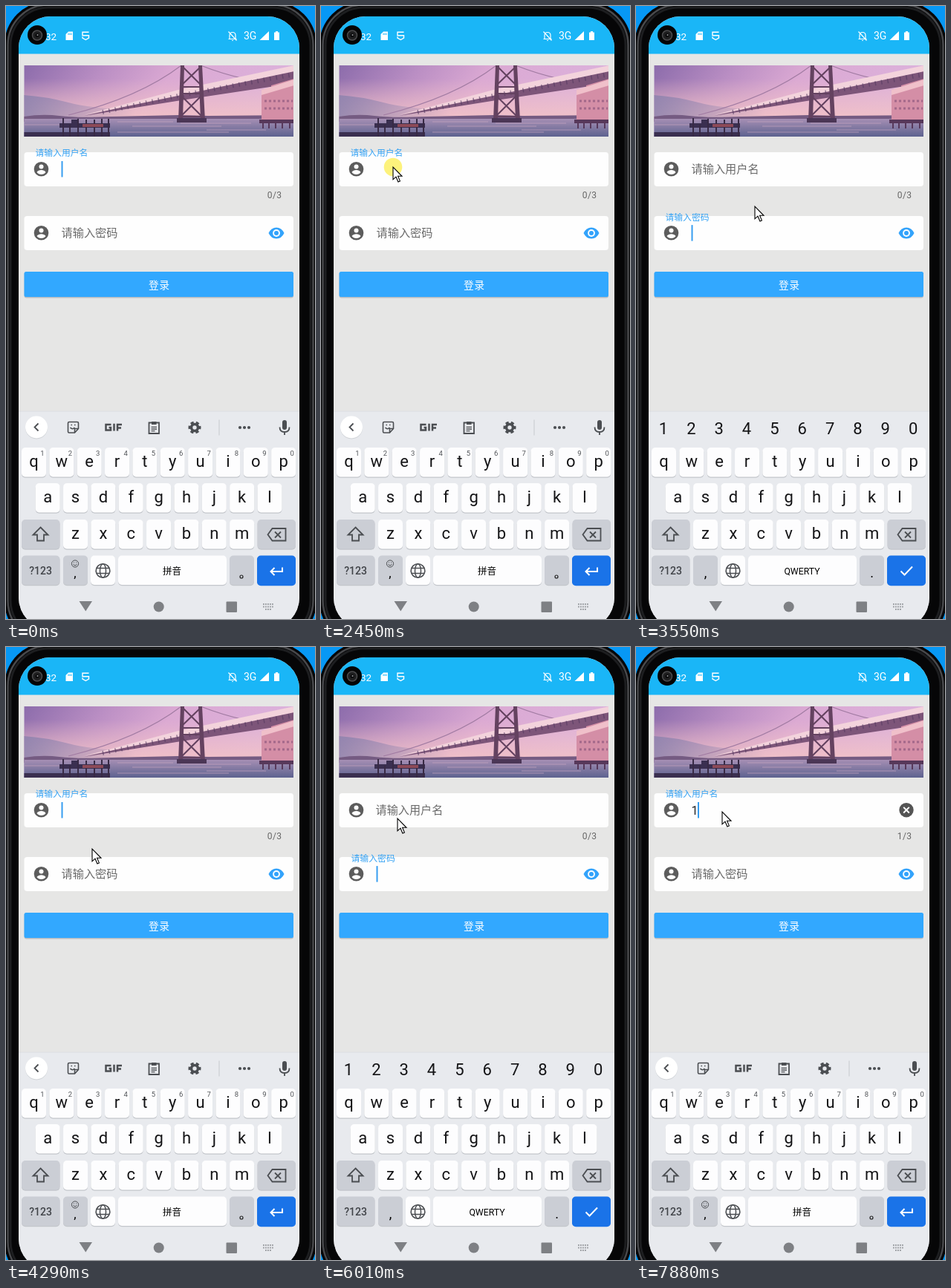
Write an HTML page that moves like this. It is 416 by 826 pixels and loops after 8000 ms.

```html
<!DOCTYPE html>
<html lang="zh-CN">
<head>
<meta charset="utf-8">
<title>Login form</title>
<style>
html, body { margin: 0; width: 100%; height: 100%; overflow: hidden; background: #0798f5; }
svg { display: block; width: 416px; height: 826px; font-family: Roboto, 'Noto Sans CJK SC', 'Noto Sans CJK', sans-serif; }
.cjk { font-family: 'Noto Sans CJK SC', 'Noto Sans CJK', sans-serif; }
.mid { text-anchor: middle; }
.key { font-size: 22px; fill: #141416; }
.line { fill: none; stroke: #4b4e52; stroke-width: 1.8; }
</style>
</head>
<body>
<svg viewBox="0 0 416 826" xmlns="http://www.w3.org/2000/svg">
  <defs>
    <clipPath id="screen"><rect x="17" y="14" width="378" height="826" rx="43"/></clipPath>
    <clipPath id="photo"><rect x="24.5" y="80" width="362.5" height="96"/></clipPath>
    <linearGradient id="sky" x2="1" y2=".2">
      <stop stop-color="#8c6cab"/><stop offset=".3" stop-color="#bb8fc4"/>
      <stop offset=".55" stop-color="#dba9d3"/><stop offset="1" stop-color="#dcb2dc"/>
    </linearGradient>
    <linearGradient id="glow" x2="0" y2="1">
      <stop offset=".2" stop-color="#f3c3c6" stop-opacity="0"/><stop offset="1" stop-color="#f3c3c6" stop-opacity=".9"/>
    </linearGradient>
    <linearGradient id="haze">
      <stop stop-color="#8c82ad" stop-opacity=".85"/><stop offset="1" stop-color="#8c82ad" stop-opacity="0"/>
    </linearGradient>
    <linearGradient id="sea" x2="0" y2="1">
      <stop stop-color="#a68fb4"/><stop offset="1" stop-color="#5d628f"/>
    </linearGradient>
  </defs>

  <!-- phone body -->
  <rect x="-2" y="-6" width="420" height="866" rx="58" fill="#060607"/>
  <rect x="2.5" y="-1.5" width="411" height="857" rx="54" fill="none" stroke="#48494c" stroke-width="2.5"/>
  <rect x="6" y="2" width="404" height="850" rx="51" fill="none" stroke="#1d1e20" stroke-width="3"/>

  <g clip-path="url(#screen)">
    <rect x="17" y="14" width="378" height="812" fill="#e6e6e5"/>
    <rect x="17" y="14" width="378" height="50.5" fill="#1ab6f7"/>

    <!-- status bar -->
    <g fill="#fff" font-size="13.5">
      <text x="53" y="45.5">32</text>
      <path d="M84 34.5h6v11.5h-9.500v-8z"/>
      <path d="M84 36.500v2.500M86 36.500v2.500M88 36.500v2.500" stroke="#1ab6f7"/>
      <path d="M111.500 35.200h-8.500v4.500h8.500v3.300l-4.200 2.500-4.300-2.500v-1.500" fill="none" stroke="#fff" stroke-width="1.400"/>
      <path d="M301 44.500v-5q0-4 4-4t4 4v5zM299.500 44.500h11M304 46.500h2M299.500 34.500l11 12" fill="none" stroke="#fff" stroke-width="1.2"/>
      <text x="320" y="45.3" font-size="14">3G</text>
      <path d="M354 34v12h-12.500zM362 35.500h1v-1.500h3v1.500h2v10.500h-7v-10.500z"/>
    </g>
    <circle cx="42" cy="39" r="13" fill="#050505"/>
    <circle cx="42" cy="39.500" r="6.500" fill="#1f1f20" stroke="#4a4a4c" stroke-width="1.500"/>
    <circle cx="42" cy="39.500" r="2.500" fill="#070708"/>
    <circle cx="42.500" cy="39" r="1" fill="#9b9b9d"/>

    <!-- header picture -->
    <g clip-path="url(#photo)">
      <rect x="24" y="80" width="364" height="96" fill="url(#sky)"/>
      <rect x="24" y="84" width="364" height="68" fill="url(#glow)"/>
      <path d="M24 120q30 2 60 10t90 10v14H24z" fill="url(#haze)"/>
      <path d="M24 149q25-4 48-1t70 1l90-2 40 1 116-1v9H24z" fill="#755b82"/>
      <rect x="24" y="152" width="364" height="24" fill="url(#sea)"/>
      <path d="M150 156h75M170 162h120M235 158h95M150 170h150M270 167h80M25 160h50" stroke="#d0abc4" opacity=".6"/>
      <path d="M84 147Q180 123 236 80M262 80Q320 103 388 108" fill="none" stroke="#a27ca3" stroke-width="1.200"/>
      <path d="M105 148L232 119 388 87v17L236 127z" fill="#7d5579"/>
      <path d="M105 147L232 113 388 80v8L236 120z" fill="#f3d3dc"/>
      <path d="M130 143l102-22 156-29" fill="none" stroke="#543a60" stroke-width="6" stroke-dasharray="1.500 7" opacity=".6"/>
      <path d="M235 80h5l-2 74h-6zM259 80h5l4 74h-6z" fill="#644260"/>
      <path d="M238 82l24 24M262 82l-25 24M237 122l26 26M262 122l-26 26M236 109h28M236 118h28M234 149h32" stroke="#644260" stroke-width="2" fill="none"/>
      <path d="M230 151h40v6h-40z" fill="#4b3656"/>
      <path d="M344 113l13-3v-3l31-9v58h-44z" fill="#d48ea6"/>
      <path d="M344 113l44-14v8l-44 13z" fill="#f0c0ca"/>
      <path d="M348 128h38M348 138h38" stroke="#a3688a" stroke-width="3" stroke-dasharray="3 3"/>
      <path d="M341 153h47v5h-47z" fill="#57385a"/>
      <path d="M346 158v7M354 158v7M363 158v7M372 158v7M382 158v7" stroke="#57385a" stroke-width="2"/>
      <path d="M72 158h16v-5h9v5h43v6H72zM24 170h116v6H24z" fill="#3a2f50"/>
      <path d="M77 151v25M86 160v16M97 152v24M108 153v23M119 153v23M129 152v24M138 152v24" stroke="#382a45" stroke-width="2"/>
      <path d="M103 159h28v4h-28z" fill="#8d4a58"/>
    </g>

    <!-- form -->
    <g id="form"></g>
    <g fill="#33a3fb" transform="translate(364 306)">
      <path d="M-10.500 0Q-7-7.500 0-7.500T10.500 0Q7 7.500 0 7.500T-10.500 0z"/>
      <circle r="4.900" fill="#fff"/><circle r="3"/>
    </g>
    <g id="clear" transform="translate(364 219.700)">
      <circle r="9.700" fill="#545454"/>
      <path d="M-3.800-3.800l7.600 7.600M3.800-3.800l-7.600 7.600" stroke="#fff" stroke-width="2"/>
    </g>
    <text id="value" x="74.500" y="225.500" font-size="16" fill="#252525">1</text>
    <text id="count" x="371.500" y="259" font-size="12" letter-spacing=".4" text-anchor="end" fill="#666"></text>
    <rect x="24.500" y="358.500" width="362.500" height="35" rx="3" fill="#b9bec3"/>
    <rect x="24.500" y="358" width="362.500" height="34" rx="2.500" fill="#32a8ff"/>
    <text class="cjk mid" x="206.300" y="380.700" font-size="13.800" letter-spacing=".6" fill="#fff">登录</text>

    <!-- keyboard -->
    <rect x="17" y="546" width="378" height="280" fill="#e8eaee"/>
    <path d="M17 546h378" stroke="#dcdee1"/>
    <g id="keys"></g>
    <g id="pinyin">
      <circle cx="41" cy="568.500" r="15" fill="#cfd2d6"/><circle cx="41" cy="567.500" r="15" fill="#fff"/>
      <g class="line">
        <path d="M43.500 562.500l-5 5 5 5"/>
        <path d="M85 560.500h11q1.500 0 1.500 1.500v7.500l-5 5.500h-7.500q-1.500 0-1.500-1.500v-11.500q0-1.500 1.500-1.500zM97 569.500h-4.500v5" stroke-width="1.600"/>
        <path d="M86.500 568q3 3.500 6 0M87.500 564.500h1.500M92 564.500h1.500" stroke-width="1.500"/>
        <path d="M192.500 561.500h13.500v14.500h-13.500z"/>
        <path d="M196 562h6.500" stroke-width="4"/>
        <path d="M195.500 567.300h7.500M195.500 570h7.500M195.500 572.700h5" stroke-width="1.300"/>
        <circle cx="254" cy="568" r="4.500" stroke-width="3.600"/>
        <circle cx="254" cy="568" r="7" stroke-width="3" stroke-dasharray="4.200 3.130" stroke-dashoffset="2.100"/>
        <path d="M287 557.500v21" stroke="#c6c9cd" stroke-width="1"/>
        <path d="M368.500 567.500q0 6.500 6.500 6.500t6.500-6.500M375 574v4"/>
      </g>
      <g fill="#4b4e52">
        <circle cx="315" cy="568" r="2.100"/><circle cx="321" cy="568" r="2.100"/><circle cx="327" cy="568" r="2.100"/>
        <rect x="372" y="558" width="6" height="13" rx="3"/>
        <path d="M141.500 564h-7v7.500h6.500v-3.500h-2.500M145.500 562.700v9.800M150 572.500v-8.500h6M150 568.500h5" fill="none" stroke="#4b4e52" stroke-width="2.500"/>
      </g>
      <g id="supers" font-size="9.500" fill="#505357"></g>
      <circle cx="93" cy="751.500" r="4.600" fill="none" stroke="#4b4e52"/>
      <path d="M90.500 752.500q2.500 3 5 0M91.500 749.500v1M94.500 749.500v1" fill="none" stroke="#4b4e52"/>
      <text class="mid" x="93" y="770" font-size="17">,</text>
      <circle cx="317" cy="769" r="2" fill="none" stroke="#222" stroke-width="1.200"/>
      <text class="cjk mid" x="223.500" y="765.500" font-size="12.500">拼音</text>
      <path d="M372 756.500v5.500h-15M361.500 757l-5 5 5 5" fill="none" stroke="#fff" stroke-width="2"/>
    </g>
    <g id="qwerty">
      <g id="digits"></g>
      <text class="mid" x="93.500" y="770" font-size="18">,</text>
      <text class="mid" x="317.500" y="770" font-size="18">.</text>
      <text class="mid" x="223.500" y="765.500" font-size="12.300">QWERTY</text>
      <path d="M356.500 761.500l5 5 10.500-11" fill="none" stroke="#fff" stroke-width="2"/>
    </g>

    <!-- special keys and navigation -->
    <g class="line">
      <path d="M46.500 702.500l10 10h-5.500v8h-9v-8h-5.500z"/>
      <path d="M358.500 704h18v16.500h-18l-6-8.250zM362 708.500l8 8M370 708.500l-8 8"/>
      <circle cx="130.500" cy="761" r="9.300" stroke-width="1.600"/>
      <ellipse cx="130.500" cy="761" rx="4" ry="9.300" stroke-width="1.500"/>
      <path d="M122 757.500h17M122 764.500h17" stroke-width="1.500"/>
    </g>
    <text class="mid" x="46.500" y="766" font-size="14" fill="#414449" font-weight="500">?123</text>
    <g fill="#7e8084">
      <path d="M98.500 802h17.500l-8.750 13.500z"/><circle cx="205.700" cy="809.500" r="7"/><rect x="296.500" y="802.500" width="14.500" height="14.500" rx="1"/>
    </g>
    <path d="M346 806h15M346 809.500h15M349 813h9" fill="none" stroke="#9b9ea2" stroke-width="1.800" stroke-dasharray="1.800 1.200"/>
  </g>

  <circle id="press" r="12.300" fill="#fdf27c"/>
  <path id="mouse" d="M0 0V16.800L4 13.200 6.900 20 9.400 18.900 6.600 12.300H12z" fill="#fff" stroke="#000" stroke-width="1.100"/>
</svg>
<script>
const LOOP = 8000, TYPED = 7670, SLIDE = 167, SWAP = 120;
const $ = id => document.getElementById(id);
const text = (x, y, s, cls = 'mid key') => `<text class="${cls}" x="${x}" y="${y}">${s}</text>`;
const key = (x, y, w = 33, fill = '#fdfdfe', shade = '#c3c6cb') =>
  `<rect x="${x}" y="${y + 1.2}" width="${w}" height="39.5" rx="5" fill="${shade}"/>` +
  `<rect x="${x}" y="${y}" width="${w}" height="39.5" rx="5" fill="${fill}"/>`;

const PITCH = 37.35, GREY = '#cbced5', BLUE = '#1a73e8';
const row = (letters, x, y) => [...letters].map((c, i) =>
  key(x + i * PITCH, y) + text(x + 16.5 + i * PITCH, y + 26, c)).join('');
const digits = (x, y, cls) => [...'1234567890'].map((c, i) => text(x + i * PITCH, y, c, cls)).join('');

$('keys').innerHTML = row('qwertyuiop', 21, 595) + row('asdfghjkl', 39.7, 643) + row('zxcvbnm', 77, 692) +
  key(21, 692, 51.5, GREY) + key(338.5, 692, 51.5, GREY) +
  key(21, 740.5, 51.5, GREY) + key(77, 740.5, 33, GREY) + key(114, 740.5) + key(151, 740.5, 146) +
  key(301, 740.5, 33, GREY) + key(338, 740.5, 52, BLUE, BLUE);
$('supers').innerHTML = digits(49, 605.5, 'mid');
$('digits').innerHTML = digits(37, 577, 'mid key');

const fields = [{ hint: '请输入用户名', y: 219.7 }, { hint: '请输入密码', y: 305.8 }];
$('form').innerHTML = fields.map(({ hint, y }, i) => `
  <rect x="24.500" y="${y - 22.7}" width="362.500" height="46" rx="4" fill="#fefefe"/>
  <g transform="translate(47.500 ${y})"><circle r="9.800" fill="#5c5c5c"/><circle cy="-3.200" r="3" fill="#fff"/>
  <path d="M-6 4.200Q-4 1.400 0 1.400T6 4.200Q4 7.200 0 7.200T-6 4.200z" fill="#fff"/></g>
  <rect id="caret${i}" x="74.500" y="${y - 10.7}" width="2" height="21.500" fill="#369df0"/>
  <text id="hint${i}" class="cjk" font-size="15.200">${hint}</text>`).join('');

// [time, field]: every tap that gives a field the focus
const taps = [[-250, 0], [2575, 0], [3090, 1], [4010, 0], [4720, 1], [5205, 0], [5860, 1], [6365, 0]];

// [time, x, y] of the pointer tip
const path = [
  [70, 390, 779], [450, 300, 438], [650, 300, 438], [1450, 203, 260], [1990, 138, 226], [2250, 138, 226],
  [2420, 97, 217], [2600, 97, 217], [2960, 144, 302], [3150, 144, 302], [3550, 160, 270], [3860, 125, 222],
  [4050, 125, 222], [4290, 116, 272], [4500, 118, 302], [4760, 118, 302], [5060, 107, 220], [5260, 107, 220],
  [5660, 100, 302], [5860, 100, 302], [6010, 103, 231], [6180, 104, 217], [6870, 104, 217], [7140, 116, 222]
];

const mix = (a, b, k) => a + (b - a) * k;
const clamp = k => Math.max(0, Math.min(1, k));
const smooth = k => k * k * (3 - 2 * k);

function pointer(t) {
  const i = path.findIndex(p => p[0] > t);
  if (i < 0) return path[path.length - 1].slice(1);
  if (!i) return path[0].slice(1);
  const [a, b] = [path[i - 1], path[i]], k = smooth((t - a[0]) / (b[0] - a[0]));
  return [mix(a[1], b[1], k), mix(a[2], b[2], k)];
}

const show = (id, on) => $(id).setAttribute('opacity', +on);

function draw(t) {
  const n = taps.filter(p => p[0] <= t).length - 1;
  const [start, active] = taps[n], last = n ? taps[n - 1][1] : active;
  const since = t - start, moved = active !== last, typed = t >= TYPED;
  const blink = Math.floor((typed ? t - TYPED : since) / 500) % 2 === 0;
  const tinted = moved && since < 20 ? last : active;

  fields.forEach(({ y }, i) => {
    const k = moved ? smooth(clamp(since / SLIDE)) : 1;
    const up = i === active ? k : 1 - k;
    const hint = $('hint' + i);
    hint.setAttribute('transform',
      `translate(${mix(74.5, 39.5, up)} ${mix(y + 5.4, y - 17.3, up)}) scale(${mix(1, .777, up)})`);
    hint.setAttribute('fill', i === tinted ? '#35a2f3' : '#6a6a6a');
    // the old caret lingers briefly after the focus leaves
    show('caret' + i, i === active ? blink : moved && since < 60);
  });
  $('caret0').setAttribute('x', typed ? 83 : 74.5);

  const pwd = (since < SWAP ? last : active) === 1;
  show('pinyin', !pwd);
  show('qwerty', pwd);

  show('value', typed);
  show('clear', clamp((t - TYPED) / 150));
  $('count').textContent = (typed ? 1 : 0) + '/3';

  const at = `translate(${pointer(t).join(' ')})`;
  $('mouse').setAttribute('transform', at);
  $('press').setAttribute('transform', at);
  show('mouse', t >= 70);
  show('press', taps.some(p => t >= p[0] - 140 && t < p[0] - 15));
}

function tick() {
  draw(performance.now() % LOOP);
  requestAnimationFrame(tick);
}
tick();
</script>
</body>
</html>
```
